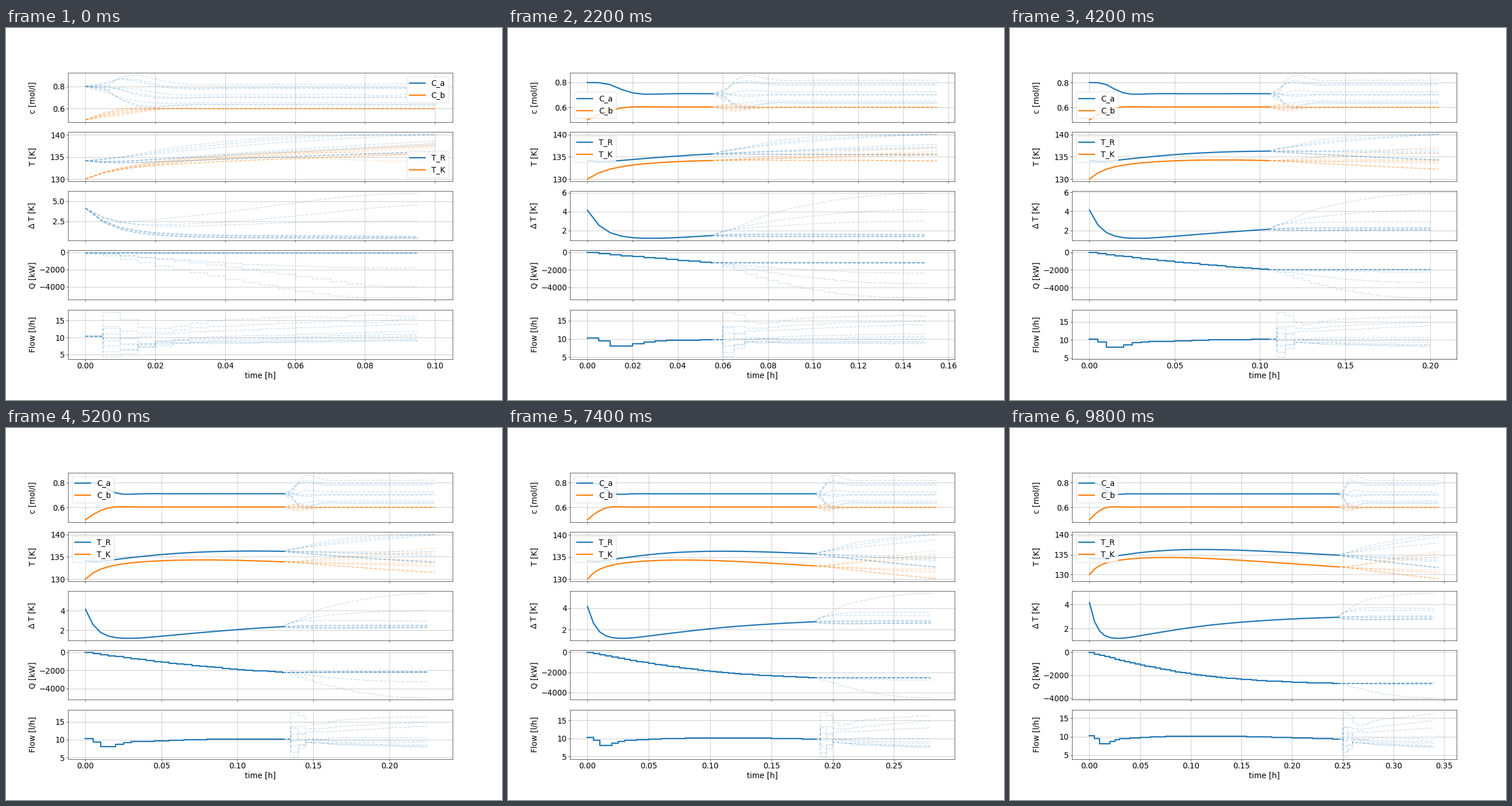
Recreate the animation shown at these times as a matplotlib script. Size 864 px wide and 648 px high, loop 10000 ms.

```python
import numpy as np
import matplotlib.pyplot as plt
from matplotlib.animation import FuncAnimation

# Robust model predictive control of a stirred tank reactor.
FRAMES, N, DT = 50, 20, 0.005
ALPHA = np.repeat([1.0, 1.05, 0.95], 3)
BETA = np.tile([1.0, 1.1, 0.9], 3)
S = len(ALPHA)

SCALE = np.array([10.0, 1000.0])      # inputs: flow, cooling power
MOVE = np.array([1e-3, 2.5e-4])       # penalty on scaled input moves
U_PREV = np.array([0.0, 0.0])
SET_POINT, T_MAX, T_WEIGHT = 0.6, 140.0, 0.005
EPS = 1e-4
LENGTHS = np.array([0, 0.01, 0.03, 0.1, 0.3, 0.6, 1.0])


def rates(x, u, alpha, beta):
    ca, cb, tr, tk = x
    flow, heat = u
    inv = 1 / (tr + 273.15)
    k0 = 1.287e12 * np.exp(-9758.3 * inv)
    r1, r2 = beta * k0 * ca, k0 * cb
    r3 = 9.043e9 * np.exp(-8560.0 * alpha * inv) * ca ** 2
    rho_cp, kw = 0.9342 * 3.01, 4032.0 * 0.215
    gap = tr - tk
    return np.stack([
        flow * (5.1 - ca) - r1 - r3,
        -flow * cb + r1 - r2,
        -(4.2 * r1 - 11.0 * r2 - 41.85 * r3) / rho_cp
        + flow * (130.0 - tr) - kw * gap / (rho_cp * 10.01),
        (heat + kw * gap) / 10.0])


def step(x, u, alpha, beta):
    k1 = rates(x, u, alpha, beta)
    k2 = rates(x + DT / 2 * k1, u, alpha, beta)
    k3 = rates(x + DT / 2 * k2, u, alpha, beta)
    k4 = rates(x + DT * k3, u, alpha, beta)
    return x + DT / 6 * (k1 + 2 * k2 + 2 * k3 + k4)


def rollout(x, z):
    """States along the horizon for scaled inputs z[step, input, ..., scenario]."""
    u = z * SCALE.reshape((1, 2) + (1,) * (z.ndim - 2))
    x = np.broadcast_to(x.reshape((4,) + (1,) * (z.ndim - 2)), (4,) + z.shape[2:])
    out = [x]
    for k in range(N):
        x = step(x, u[k], ALPHA, BETA)
        out.append(x)
    return np.array(out)


def cost(x, z, prev):
    """Objective of each candidate z[step, input, candidate, scenario]."""
    path = rollout(x, z)
    track = ((path[1:, 1] - SET_POINT) ** 2).sum(0)
    over = (np.maximum(path[1:-1, 2] - T_MAX, 0) ** 2).sum(0)
    weight = MOVE[:, None, None]
    moves = (np.diff(z, axis=0) ** 2 * weight).sum((0, 1))
    first = (MOVE[:, None] * (z[0, :, :, 0] - prev[:, None]) ** 2).sum(0)
    return np.nan_to_num(((track + moves) / S + T_WEIGHT * over).sum(1) + first,
                         nan=1e9)


DIFF = np.sqrt(np.tile(MOVE, N - 1) / S)[:, None] * (
    np.eye(2 * N)[2:] - np.eye(2 * N)[:-2])


def direction(x, z, prev):
    """Gauss-Newton direction; the first input is shared by all scenarios."""
    bumps = np.concatenate([np.zeros((1, 2 * N)), np.eye(2 * N)]) * EPS
    path = rollout(x, z[:, :, None, :] + bumps.T.reshape(N, 2, -1, 1))
    base = path[:, :, 0]
    jac = (path[:, :, 1:] - path[:, :, :1]) / EPS

    over = np.maximum(base[1:-1, 2] - T_MAX, 0)
    flat = z.reshape(2 * N, S)
    wc, wt = np.sqrt(1 / S), np.sqrt(T_WEIGHT)
    a = np.concatenate([wc * jac[1:, 1],
                        wt * jac[1:-1, 2] * (over > 0)[:, None],
                        np.repeat(DIFF[:, :, None], S, 2)]).transpose(2, 0, 1)
    b = np.concatenate([wc * (base[1:, 1] - SET_POINT), wt * over, DIFF @ flat])
    at = a.transpose(0, 2, 1)
    h, g = at @ a, at @ b.T[:, :, None]

    gain = np.linalg.solve(h[:, 2:, 2:],
                           np.concatenate([h[:, 2:, :2], g[:, 2:]], 2))
    mix = (np.concatenate([h[:, :2, :2], g[:, :2]], 2) - h[:, :2, 2:] @ gain).sum(0)
    d0 = -np.linalg.solve(mix[:, :2] + np.diag(MOVE),
                          mix[:, 2] + MOVE * (flat[:2, 0] - prev))
    rest = -(gain[:, :, 2] + gain[:, :, :2] @ d0)
    return np.concatenate([np.tile(d0, (S, 1)), rest], 1).T.reshape(N, 2, S)


def optimise(x, z, prev, tries):
    for _ in range(tries):
        move = direction(x, z, prev)
        options = z[:, :, None] + LENGTHS[:, None] * move[:, :, None]
        costs = cost(x, options, prev)
        best = costs.argmin()
        z = options[:, :, best]
        if costs[0] - costs[best] < 1e-4 * costs[0]:
            break
    return z


def closed_loop():
    x = np.array([0.8, 0.5, 134.14, 130.0])
    z = np.tile(np.array([0.9, -0.25])[None, :, None], (N, 1, S))
    prev = U_PREV / SCALE
    states, inputs = [], []
    for k in range(FRAMES):
        z = optimise(x, z, prev, 8 if k else 40)
        states.append(rollout(x, z))
        inputs.append(z * SCALE[:, None])
        prev = z[0, :, 0]
        x = step(x, prev * SCALE, 1.0, 1.0)
        z = np.concatenate([z[1:], z[-1:]])
        z[0] = z[0].mean(1, keepdims=True)
    return np.array(states), np.array(inputs)


states, inputs = closed_loop()
c_a, c_b, t_r, t_k = (states[:, :, i] for i in range(4))
flow, heat = inputs[:, :, 0], inputs[:, :, 1]

plt.rcParams.update({"font.family": "DejaVu Sans", "font.size": 18,
                     "axes.grid": True})
BLUE, ORANGE = "#1f77b4", "#ff7f0e"
fig, axes = plt.subplots(5, sharex=True, figsize=(16, 12), dpi=54)
curves = []


def add(ax, data, color=BLUE, style="default"):
    solid, = ax.plot([], [], color=color, lw=3, drawstyle=style)
    dashed = [ax.plot([], [], "--", color=color, lw=2, alpha=0.2,
                      drawstyle=style)[0] for _ in range(S)]
    curves.append((data, solid, dashed))
    return solid


c_lines = [add(axes[0], c_a), add(axes[0], c_b, ORANGE)]
t_lines = [add(axes[1], t_r), add(axes[1], t_k, ORANGE)]
add(axes[2], (t_r - t_k)[:, :-1])
add(axes[3], heat, style="steps-post")
add(axes[4], flow, style="steps-post")

labels = ["c [mol/l]", "T [K]", r"$\Delta$ T [K]", "Q [kW]", "Flow [l/h]"]
for ax, label in zip(axes, labels):
    ax.set_ylabel(label)
axes[-1].set_xlabel("time [h]")
axes[0].legend(c_lines, ["C_a", "C_b"], loc="best")
axes[1].legend(t_lines, ["T_R", "T_K"], loc="best")
fig.align_ylabels()


def draw(k):
    past = np.arange(k + 1) * DT
    for data, solid, dashed in curves:
        solid.set_data(past, data[:k + 1, 0, 0])
        ahead = (k + np.arange(data.shape[1])) * DT
        for s, line in enumerate(dashed):
            line.set_data(ahead, data[k, :, s])
    for ax in axes:
        ax.relim()
        ax.autoscale_view()
    return []


anim = FuncAnimation(fig, draw, frames=FRAMES, interval=200, repeat=True,
                     repeat_delay=0, cache_frame_data=False)
plt.show()
```
